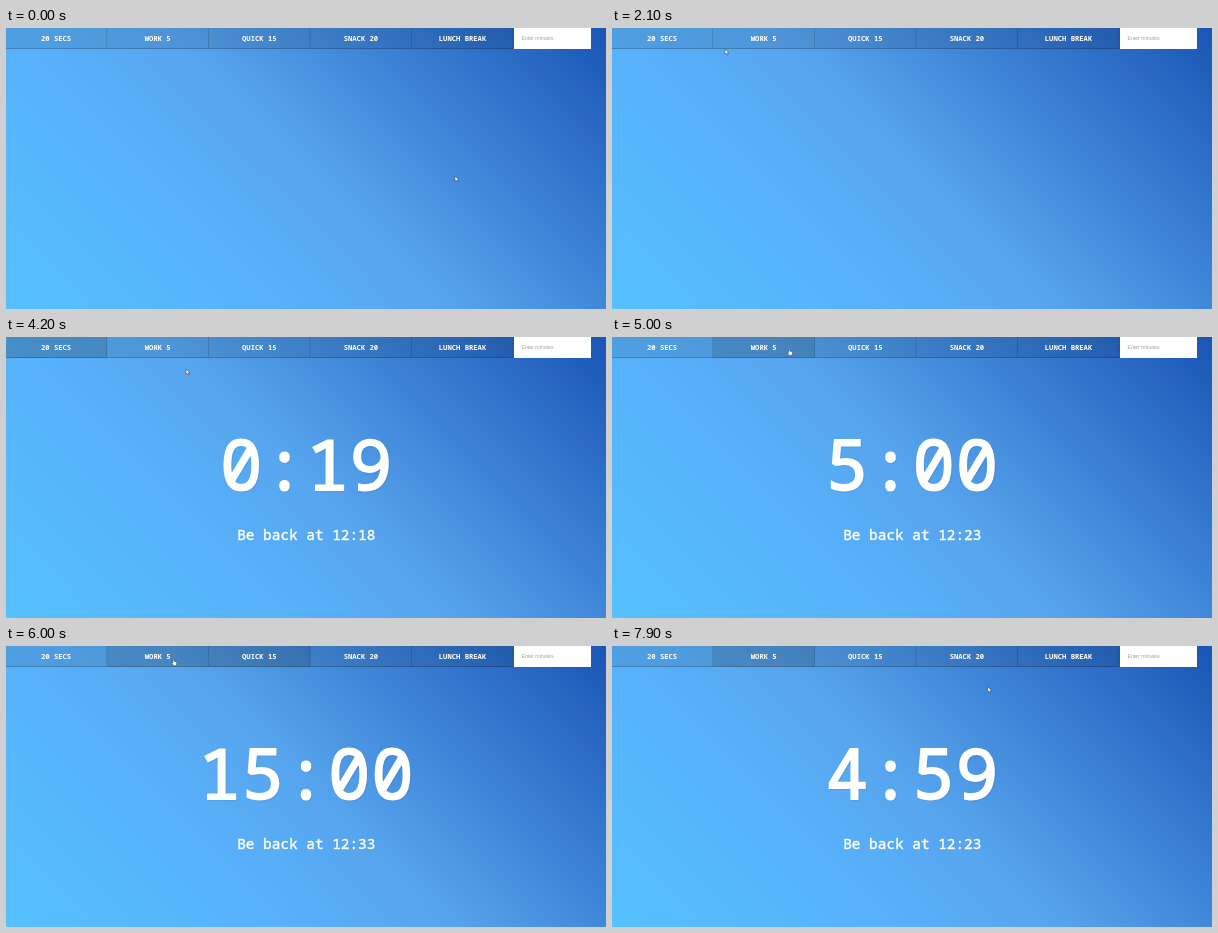
An HTML page that plays this animation: 600 by 281 pixels, repeating every 8 s.

```html
<!DOCTYPE html>
<html lang="en">
<head>
<meta charset="utf-8">
<title>Break timer</title>
<style>
  html, body { margin: 0; width: 100%; height: 100%; overflow: hidden; }
  body { background: linear-gradient(45deg, #56c1ff 0%, #57b1fb 32%, #57a5ee 50%, #1a55b5 100%); }
  svg { display: block; width: 600px; height: 281px; }
  text { font-family: "Noto Sans Mono", "DejaVu Sans Mono", monospace; fill: #fff; stroke: #fff; stroke-width: 0; text-anchor: middle; white-space: pre; }
  .label { font-size: 7.2px; font-weight: 600; }
  .hint { font: 5.2px "Liberation Sans", Arial, sans-serif; fill: #a0a0a0; text-anchor: start; }
  #clock { font-size: 70px; letter-spacing: 1.2px; stroke-width: 2px; filter: drop-shadow(1.5px 1.5px 0 rgba(0, 0, 0, .06)); }
  #back { font-size: 14.4px; stroke-width: .4px; }
  .fill { fill: #000; fill-opacity: .1; }
  .fill.on { fill-opacity: .2; }
  .edge { fill: #000; fill-opacity: .2; }
  .shape { fill: #fff; stroke: #233a58; stroke-width: .5; stroke-linejoin: round; }
  #beam { fill: none; stroke: #1d4474; stroke-width: .7; }
</style>
</head>
<body>
<svg viewBox="0 0 600 281">
  <g id="bar"></g>
  <rect x="508" width="77" height="21" fill="#fff"/>
  <text class="hint" x="515.5" y="12">Enter minutes</text>
  <text id="clock" x="300.7" y="153.2"></text>
  <text id="back" x="300.3" y="203"></text>
  <g id="pointer">
    <path id="arrow" class="shape" d="M0 0V5.4L1.3 4.3L2.1 6.2L3 5.8L2.2 4H3.9Z"/>
    <path id="hand" class="shape" d="M1 0Q1.6 -.6 2.1 .2V2.2L4.7 2.9V5L4 6.7H1.6L-.2 3.9Q0 3.1 1 3.7Z"/>
    <path id="beam" d="M-1.2 0H1.2M0 0V6M-1.2 6H1.2"/>
  </g>
</svg>
<script>
const LOOP = 8000, STEP = 100, BUTTON = 101.6, BAR = 21;
const START = 12 * 60 + 18; // minutes of the day

const buttons = [
  { label: "20 SECS", secs: 20 },
  { label: "WORK 5", secs: 5 * 60 },
  { label: "QUICK 15", secs: 15 * 60 },
  { label: "SNACK 20", secs: 20 * 60 },
  { label: "LUNCH BREAK", secs: 60 * 60 }
];

// Pointer stops, joined by straight glides
const stops = [
  { t: 0, x: 449, y: 148 },
  { t: 1000, x: 286, y: 81 },
  { t: 2100, x: 113, y: 21 },
  { t: 2500, x: 45, y: 9 },
  { t: 2900, x: 45, y: 9 },
  { t: 3200, x: 152, y: 29 },
  { t: 4200, x: 180, y: 32 },
  { t: 4900, x: 160, y: 13 },
  { t: 5500, x: 254, y: 6 },
  { t: 6000, x: 166, y: 13 },
  { t: 6500, x: 166, y: 13 },
  { t: 6900, x: 364, y: 88 },
  { t: LOOP, x: 377, y: 36 }
];

const clicks = [
  { t: 2600, button: 0 },
  { t: 4900, button: 1 },
  { t: 5600, button: 2 },
  { t: 6500, button: 1 }
];

const $ = id => document.getElementById(id);

function add(tag, attrs, text = "") {
  const el = document.createElementNS("http://www.w3.org/2000/svg", tag);
  for (const key in attrs) el.setAttribute(key, attrs[key]);
  el.textContent = text;
  return $("bar").appendChild(el);
}

const fills = buttons.map(({ label }, i) => {
  const x = i * BUTTON - .5;
  const fill = add("rect", { class: "fill", x, width: BUTTON, height: BAR });
  add("rect", { class: "edge", x, y: BAR - 1, width: BUTTON, height: 1 });
  add("rect", { class: "edge", x: x + BUTTON - .7, width: .7, height: BAR - 1 });
  add("text", { class: "label", x: x + BUTTON / 2 - .2, y: 12.5 }, label);
  return fill;
});

function pointerAt(t) {
  const i = stops.findIndex(s => s.t > t);
  const a = stops[i - 1], b = stops[i];
  const k = (t - a.t) / (b.t - a.t);
  return [a.x + (b.x - a.x) * k, a.y + (b.y - a.y) * k];
}

const format = n => Math.floor(n / 60) + ":" + String(n % 60).padStart(2, "0");

function draw(t) {
  const click = clicks.filter(c => c.t <= t).pop();
  const [x, y] = pointerAt(t);
  const hover = y < BAR ? Math.floor(x / BUTTON) : -1;

  fills.forEach((el, i) =>
    el.classList.toggle("on", i === hover || i === click?.button));

  const secs = click && buttons[click.button].secs;
  $("clock").textContent = click ? format(secs - Math.floor((t - click.t) / 1000)) : "";
  $("back").textContent = click ? "Be back at " + format(START + Math.floor(secs / 60)) : "";

  const kind = hover >= 0 ? "hand" : click && y > 80 ? "beam" : "arrow";
  for (const id of ["arrow", "hand", "beam"])
    $(id).style.display = id === kind ? "" : "none";
  $("pointer").setAttribute("transform", `translate(${x} ${y})`);
}

function tick() {
  draw(Math.floor(performance.now() % LOOP / STEP) * STEP);
  requestAnimationFrame(tick);
}
tick();
</script>
</body>
</html>
```
